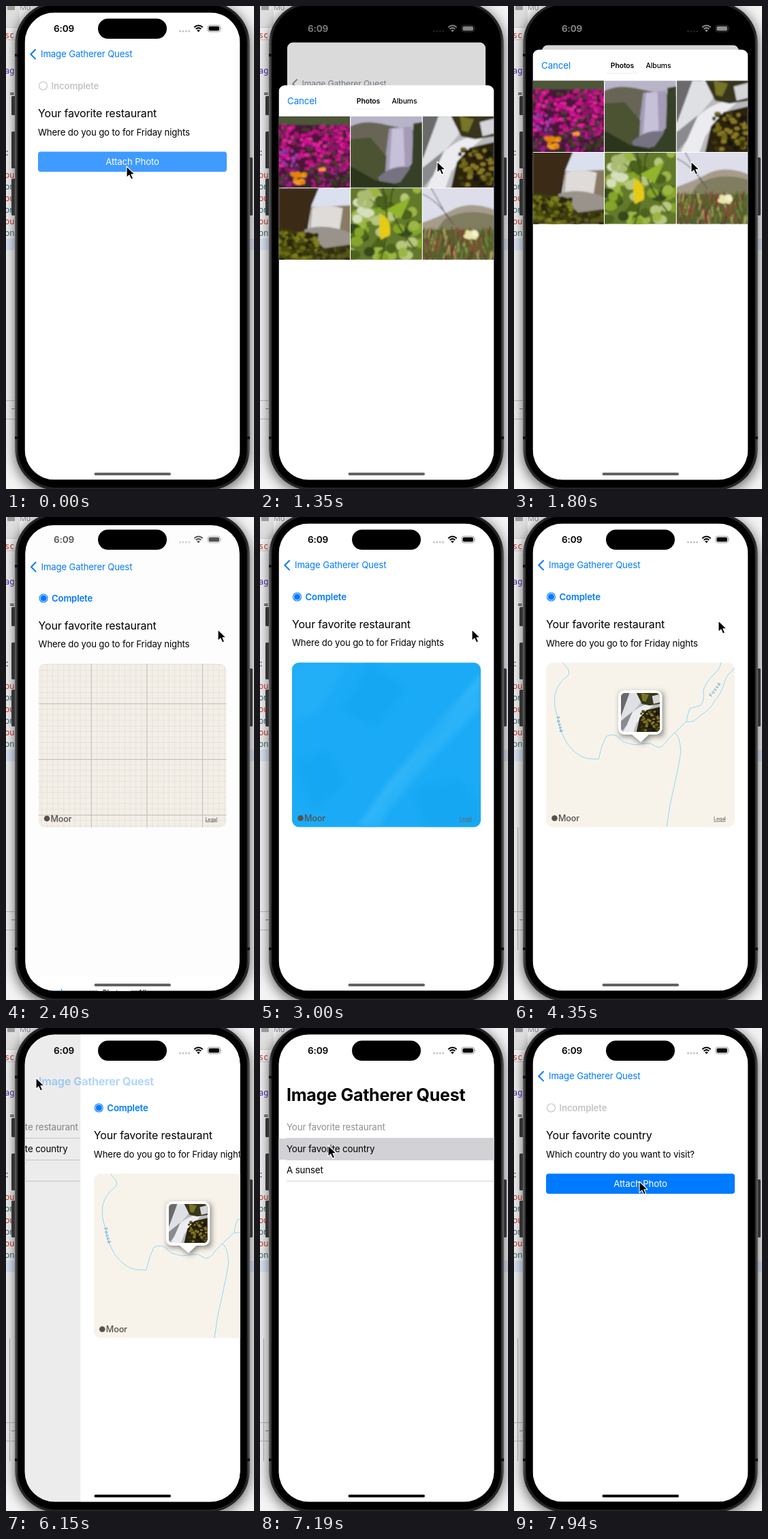
An HTML page that plays this animation: 364 by 708 pixels, repeating every 8000 ms.

```html
<!DOCTYPE html>
<html lang="en">
<head>
<meta charset="utf-8">
<title>Photo task</title>
<style>
html, body { margin: 0; width: 100%; height: 100%; overflow: hidden; background: #eee; }
svg { display: block; }
#stage { width: 100%; height: 100%; }
text { font-family: Inter, Roboto, sans-serif; letter-spacing: -.01em; white-space: pre; }
.mono { font-family: "Noto Sans Mono", "DejaVu Sans Mono", monospace; letter-spacing: 0; }
</style>
</head>
<body>
<svg id="stage" viewBox="0 0 364 708" xmlns="http://www.w3.org/2000/svg"></svg>
<script>
const LOOP = 8000, W = 316, BLUE = '#007aff';
const APP = 'Image Gatherer Quest';

const text = (x, y, size, str, attrs = '') =>
  `<text x="${x}" y="${y}" font-size="${size}" ${attrs}>${str}</text>`;
const rect = (x, y, w, h, fill, attrs = '') =>
  `<rect x="${x}" y="${y}" width="${w}" height="${h}" fill="${fill}" ${attrs}/>`;
const path = (d, fill, attrs = '') => `<path d="${d}" fill="${fill}" ${attrs}/>`;
const many = (n, fn) => Array.from({ length: n }, (_, i) => fn(i)).join('');

let seed = 7;
const rnd = (a = 0, b = 1) => {
  seed = (seed * 16807) % 2147483647;
  return a + (b - a) * seed / 2147483647;
};
const pick = list => list[Math.floor(rnd() * list.length)];
const dots = (n, x0, x1, y0, y1, r, colors) => many(n, () =>
  `<ellipse cx="${rnd(x0, x1).toFixed(1)}" cy="${rnd(y0, y1).toFixed(1)}" rx="${rnd(r * .6, r * 1.2).toFixed(1)}" ry="${(r * .7).toFixed(1)}" fill="${pick(colors)}"/>`);
const blades = (n, x0, x1, y0, y1, len, colors) => many(n, () =>
  path(`M${rnd(x0, x1).toFixed(1)} ${rnd(y0, y1).toFixed(1)}l${rnd(-5, 5).toFixed(1)} ${-len}`, 'none', `stroke="${pick(colors)}" stroke-width="1.6"`));

// Each photo is a 100 x 100 sketch.
const photos = [
  rect(0, 0, 100, 100, '#4a1737') + rect(0, 0, 100, 12, '#4d5639')
    + dots(260, 0, 100, 13, 80, 3.6, ['#d3108f', '#b40c7c', '#e0269f', '#c8128a', '#8c1268', '#493a32'])
    + dots(110, 0, 100, 72, 100, 3.4, ['#38421f', '#542254', '#28301a', '#9c1a78'])
    + dots(22, 0, 26, 45, 72, 2.5, ['#a343bd', '#8a38a6'])
    + dots(16, 18, 40, 77, 94, 4.2, ['#f5a51d', '#e4820b']) + dots(3, 58, 64, 71, 75, 3.5, ['#f5a51d']),
  rect(0, 0, 100, 100, '#b7b4c8') + path('M0 14Q20 4 50 12L100 22V100H0z', '#686556')
    + path('M54 17L86 14 92 76 46 78z', '#a49cb6') + path('M58 17L74 16 76 74 54 76z', '#c6c0d8')
    + path('M0 32L28 30 50 56 48 88 30 100H0z', '#4c5230') + path('M88 10L100 8V100H58L86 66z', '#364025')
    + path('M38 86Q60 66 84 72L70 92 44 98z', '#777282') + path('M0 70L35 90 60 94 70 100H0z', '#2a341c'),
  rect(0, 0, 100, 100, '#b9babd') + path('M0 0H36L25 42 0 62z', '#6a6a6b')
    + path('M22 0H56L50 26 30 50 0 92V60z', '#dfe0e4') + path('M28 52Q50 28 92 24L62 50 40 78 32 100H6z', '#ececf0')
    + path('M40 0H100V28L74 32 54 28z', '#38361b') + path('M52 0L72 4 64 22 55 20z', '#777428')
    + path('M100 36L66 44 48 64 40 100H100z', '#29230f')
    + dots(60, 52, 100, 44, 98, 4, ['#6f6719', '#3d390e', '#171509', '#8a7925'])
    + path('M0 72L30 48 14 84 0 100z', '#898b8e') + path('M80 8L100 3V24L84 28z', '#d4d4d9'),
  rect(0, 0, 100, 100, '#dbe0ee') + path('M0 0H56L46 24 40 62H0z', '#3b2b18')
    + path('M46 26L100 24V66H42z', '#8a7a64') + path('M47 27Q70 22 90 28L85 62H44z', '#dedbd8')
    + path('M36 58Q64 48 100 62V100H36z', '#99938c') + path('M0 56L38 62 64 84 100 79V100H0z', '#3a3b10')
    + dots(90, 0, 55, 62, 100, 4, ['#696d13', '#2a270f', '#50500f', '#82801f'])
    + dots(28, 55, 100, 84, 100, 4, ['#332c18', '#5a5a17']),
  rect(0, 0, 100, 100, '#62782a') + dots(54, 0, 100, 0, 100, 10, ['#84a42b', '#4c621f', '#9cb644', '#36491e', '#b8c77d'])
    + dots(10, 0, 28, 0, 45, 9, ['#d5dfba', '#a9bc72']) + path('M45 0Q58 50 42 100M60 0Q45 30 90 85', 'none', 'stroke="#414e1d" stroke-width="2"')
    + path('M50 30L84 12 70 43z', '#91b52b') + path('M42 36Q58 42 55 66L42 72Q38 55 42 36z', '#e5cb14'),
  rect(0, 0, 100, 100, '#dddeea') + path('M0 48Q28 38 46 28 70 18 100 30V70H0z', '#a69c8b')
    + path('M30 44Q60 26 100 38V64H15z', '#817d61') + rect(0, 58, 100, 42, '#59602f')
    + blades(160, 0, 100, 68, 106, 14, ['#78863a', '#934137', '#4e642c', '#a9a764', '#692d2d'])
    + path('M0 8Q25 20 43 51M12 0L36 43', 'none', 'stroke="#55515a"')
    + dots(9, 62, 74, 61, 69, 5, ['#f4f1ce', '#e8e5ad'])
];
const photo = (i, x, y, size, attrs = '') =>
  `<svg x="${x}" y="${y}" width="${size}" height="${size}" viewBox="0 0 100 100" ${attrs}><use href="#photo${i}"/></svg>`;

const defs = `<defs>
  ${photos.map((p, i) => `<g id="photo${i}">${p}<g filter="url(#haze)">${p}</g></g>`).join('')}
  <clipPath id="screen">${rect(27.5, 9.5, W, 685, '#000', 'rx="44"')}</clipPath>
  <clipPath id="map">${rect(47, 213.5, 277, 241, '#000', 'rx="10"')}</clipPath>
  <clipPath id="thumb">${rect(157, 258, 57, 57, '#000', 'rx="6"')}</clipPath>
  <filter id="blur" x="-20%" y="-20%" width="140%" height="140%"><feGaussianBlur stdDeviation="9"/></filter>
  <filter id="soft" x="-40%" y="-40%" width="180%" height="180%"><feGaussianBlur stdDeviation="4"/></filter>
  <filter id="haze"><feGaussianBlur stdDeviation=".8"/></filter>
  <linearGradient id="rim"><stop stop-color="#666"/><stop offset=".012" stop-color="#242426"/><stop offset=".988" stop-color="#242426"/><stop offset="1" stop-color="#666"/></linearGradient>
</defs>`;

const code = [[47, 'sc:', '#c8372d'], [99, 'agl', '#4b21a5'], [133, ' =', '#222'], [219, ':', '#222']]
  .concat([0, 1, 2, 3, 4, 5].map(i => [252 + i * 17, i % 2 ? 'on' : 'ou', i % 2 ? '#2f6b74' : '#c8372d']));

const backdrop = rect(0, 0, 364, 708, '#f3f3f3') + rect(0, 0, 20, 31, '#dedede') + rect(2, 0, 11, 6, '#999', 'rx="1"')
  + text(20, 6, 11, 'Mo', 'fill="#888"') + rect(0, 31, 16, 1, '#ccc') + rect(0, 49, 16, 1, '#ccc')
  + rect(0, 341, 364, 17, '#dce6f7')
  + code.map(([y, s, c]) => text(-2, y, 12, s, `class="mono" fill="${c}"`)).join('')
  + rect(0, 578, 14, 1, '#bbb') + rect(0, 605, 14, 1, '#bbb') + rect(8, 590, 5, 1, '#888')
  + rect(5, 455, 1, 180, '#b5b5b5', 'id="rule"')
  + rect(13, -2, 345, 716, '#000', 'rx="60" opacity=".6" filter="url(#blur)"')
  + [[132, 28], [184, 54], [253, 54]].map(([y, h]) => rect(8, y, 6, h, '#333', 'rx="1.5"')).join('')
  + rect(357, 222, 5, 85, '#333', 'rx="1.5"')
  + rect(13, -6, 345, 716, 'url(#rim)', 'rx="62"') + rect(17.5, -2, 336, 708, '#000', 'rx="56"')
  + rect(13, 70, 4, 4, '#111') + rect(13, 631, 4, 4, '#111') + rect(354, 631, 4, 4, '#111');

const row = (y, str, color) => text(39, y + 5, 13.3, str, `fill="${color}"`)
  + rect(39, y + 16, 305, 1, '#d4d4d6');
const list = `<g id="list">${rect(-80, 9, 540, 686, '#fff')}${rect(27, 162, 317, 31, '#d1d1d6', 'id="rowHit"')}
  ${row(145, 'Your favorite restaurant', '#8e8e93')}${row(177, 'Your favorite country', '#000')}${row(208, 'A sunset', '#000')}</g>
  ${rect(27, 9, 317, 686, '#000', 'id="listDim"')}`;

const lines = (step, color, w, x0, y0) => path(
  many(Math.ceil(290 / step), i => `M${(x0 + i * step).toFixed(1)} 213v242`) + many(Math.ceil(250 / step), i => `M47 ${(y0 + i * step).toFixed(1)}h278`),
  'none', `stroke="${color}" stroke-width="${w}"`);
const river = path('M71 213L80 224Q83 231 76 235 65 243 60 260 58 278 64 293 67 314 78 332 92 351 108 354L124 355 129 336 135 322Q142 317 151 321L161 330 177 334 191 332 200 332 212 338Q219 337 226 326L237 315 253 300Q255 288 258 281L274 276Q280 269 278 254 282 241 293 231 302 224 304 213M253 300Q264 302 272 292 290 281 294 270 304 260 310 239 313 230 325 221M235 316Q243 318 245 344 242 364 237 385L229 422 224 455',
  'none', 'stroke="#92d6f5"');
const label = (x, y, a) => text(x, y, 7, 'Fossá', `fill="#4a91c4" text-anchor="middle" style="letter-spacing:.14em" transform="rotate(${a} ${x} ${y})"`);
const map = `<g id="mapBox"><g clip-path="url(#map)">
  <g id="grid">${rect(47, 213, 278, 242, '#f5f1ea')}${lines(8.18, '#e8e2d8', .8, 51.5, 215)}${lines(82, '#c4c0b8', 1, 125, 272.5)}</g>
  <g id="sea">${rect(47, 213, 278, 242, '#1babf6')}
    <g filter="url(#soft)">${path('M47 213H128L86 284 47 300z', '#20aff7')}${path('M144 455L193 384 260 320 325 228V278L250 356 188 430 174 455z', '#2cb3f8')}
    ${path('M160 213L216 250 170 310 118 284zM226 400L290 380 325 420V455H240zM47 360L100 340 126 390 80 430z', '#17a7f3')}
    ${path('M150 450Q220 350 325 235', 'none', 'stroke="#50c0fa" stroke-width="5" opacity=".4"')}</g></g>
  <g id="land">${rect(47, 213, 278, 242, '#f7f3ea')}<g id="rivers">${river}${label(65, 305, 75)}${label(297, 254, -55)}</g></g></g>
  <circle cx="59.5" cy="441.5" r="4.3" fill="#55524e"/>
  ${text(65, 446, 12.6, 'Moor', 'fill="#55524e" font-weight="500"')}
  ${text(293, 445, 7, 'Legal', 'fill="#666" text-decoration="underline" font-weight="500"')}
  <g id="pin">${path('M154 256H217V319H199L186 331 172 319H154z', '#000', 'opacity=".5" filter="url(#soft)" transform="translate(2 2)"')}
    ${rect(153, 254, 64.5, 65, '#fff', 'rx="9"')}${path('M172 318H199L186 330z', '#fff')}
    <g clip-path="url(#thumb)">${photo(2, 157, 258, 57)}</g></g></g>`;

const page = `<g id="page">${rect(27.5, 9.5, W, 685, '#fff', 'id="card"')}
  <circle id="ring" cx="54.5" cy="117" r="6" fill="none"/><circle id="dot" cx="54.5" cy="117" r="4.6" fill="${BLUE}"/>
  ${text(66.5, 121.8, 13.2, '', 'id="state" font-weight="600"')}
  ${text(47, 163, 16, '', 'id="title"')}${text(47, 189.5, 13.2, '', 'id="sub"')}
  <g id="button">${rect(47, 213.5, 277, 29.5, BLUE, 'rx="4"')}${text(185.5, 233, 13.2, 'Attach Photo', 'fill="#fff" text-anchor="middle"')}</g>
  ${map}</g>`;

const nav = `<g id="nav">${path('M43 64L36.3 70.7 43 77.4', 'none', 'id="chevron" stroke-width="2" stroke-linecap="round" stroke-linejoin="round"')}
  ${text(0, 0, 13, APP, 'id="back"')}${text(0, 0, 13, APP, 'id="large" font-weight="700"')}</g>
  ${rect(27.5, 9.5, W, 685, '#000', 'id="dim"')}`;

const sheet = `<g id="sheet">${rect(27.5, 0, W, 720, '#fff', 'rx="9"')}
  ${text(40, 27.5, 13.4, 'Cancel', `fill="${BLUE}"`)}
  ${rect(135, 12, 48, 23, '#dedee2', 'rx="5"')}${rect(135, 11.5, 48, 23, '#fff', 'rx="5"')}
  ${text(159, 26.5, 10.4, 'Photos', 'text-anchor="middle" font-weight="600"')}
  ${text(212, 26.5, 10.4, 'Albums', 'text-anchor="middle" font-weight="500"')}
  ${many(6, i => photo(i, 27.5 + i % 3 * 105.7, 45.5 + Math.floor(i / 3) * 105.5, 104.5))}</g>`;

const status = `<g id="status">${text(85, 38, 13.6, '6:09', 'fill="currentColor" font-weight="600" text-anchor="middle"')}
  ${many(4, i => `<circle cx="${255.5 + i * 4.4}" cy="37" r="1.4" fill="currentColor" opacity=".25"/>`)}
  ${path('M276.3 31.3Q282.5 25.8 288.7 31.3M278.6 33.8Q282.5 30.5 286.4 33.8', 'none', 'stroke="currentColor" stroke-width="2"')}
  ${path('M280.2 35.8Q282.5 33.8 284.8 35.8L282.5 38.2z', 'currentColor')}
  ${rect(296, 28.2, 18.5, 9.6, 'none', 'rx="3" stroke="currentColor" stroke-opacity=".4"')}
  ${rect(297.5, 29.7, 15.5, 6.6, 'currentColor', 'rx="1.7"')}${path('M315.7 31.3q1.6 1.7 0 3.4z', 'currentColor', 'opacity=".5"')}</g>
  ${rect(135, 18.5, 101, 29.5, '#000', 'rx="14.7"')}${rect(129.5, 684, 112.5, 4, '#000', 'id="home" rx="2"')}`;

const cursor = `<g id="cursor">${path('M0 0V16.5L3.9 12.9 6.6 19 9.6 17.7 6.9 11.8H12.2z', '#000', 'stroke="#fff" stroke-width="1.1" stroke-linejoin="round"')}</g>`;

document.getElementById('stage').innerHTML = defs + backdrop
  + `<g clip-path="url(#screen)">${rect(27, 9, 317, 686, '#000')}${list}${page}${nav}${sheet}${status}</g>` + cursor;

const el = {};
document.querySelectorAll('[id]').forEach(n => el[n.id] = n);
const set = (id, attrs) => { for (const k in attrs) el[id].setAttribute(k, attrs[k]); };
const show = (id, on) => set(id, { display: on ? 'inline' : 'none' });
const clamp = v => Math.max(0, Math.min(1, v));
const mix = (a, b, k) => a + (b - a) * k;
const ramp = (t, a, b) => clamp((t - a) / (b - a));

// Critically damped spring, 0 to 1.
const spring = ms => {
  const x = Math.max(0, ms) * .0167;
  return 1 - (1 + x) * Math.exp(-x);
};

// time, x, y of the pointer tip
const moves = [
  [0, 177, 235], [550, 177, 235], [1050, 260, 228], [2085, 260, 228], [2390, 311, 165],
  [4150, 311, 165], [4350, 300, 152], [4650, 160, 112], [5050, 160, 112], [5600, 44, 73],
  [6250, 44, 73], [6800, 100, 172], [7400, 100, 172], [7880, 184, 225], [LOOP, 184, 225]
];
function pointer(t) {
  const i = moves.findIndex(m => m[0] > t);
  const [a, b] = [moves[i - 1], moves[i]];
  let k = ramp(t, a[0], b[0]);
  k = k * k * (3 - 2 * k);
  return [mix(a[1], b[1], k), mix(a[2], b[2], k)];
}

function draw(t) {
  const leaving = t >= 2085, second = t >= 7000, done = leaving && !second;
  const up = leaving ? 1 - spring(t - 2085) : spring(t - 1104);
  const behind = leaving ? 1 - spring(t - 2120) : up;
  const q = spring(t - 6092) - spring(t - 7260);

  show('list', q > .001);
  set('list', { transform: `translate(${-105 * (1 - q)} 0)` });
  set('listDim', { opacity: q > .001 ? .1 * (1 - q) : 0 });
  show('rowHit', t >= 7150 && t < 7800);

  const scale = 1 - .086 * behind, r = mix(44, 9, clamp(behind * 1.3));
  const shrink = `translate(185.5 ${9.5 + 48 * behind}) scale(${scale}) translate(-185.5 -9.5)`;
  set('page', { transform: `translate(${W * q} 0) ${shrink}` });
  set('card', { rx: behind > .001 ? r : 0 });
  set('dim', { rx: r, opacity: .16 * behind, transform: shrink });
  set('nav', { transform: `${shrink} translate(0 ${5 * behind})` });

  const tint = `rgb(${140 * behind},${mix(122, 140, behind)},${mix(255, 140, behind)})`;
  const pressed = t >= 5800 && t < 6900;
  const size = 13.2 + 11.8 * q;
  const place = { x: 51 - 12 * q, y: 70.5 + 28 * q + size * .36, 'font-size': size };
  set('back', { ...place, fill: tint, opacity: (pressed ? .45 : 1) * (1 - q), 'font-weight': 400 + 200 * clamp(q * 3) });
  set('large', { ...place, opacity: clamp((q - .35) / .65) });
  set('chevron', { stroke: tint, opacity: (pressed ? .45 : 1) * clamp(1 - q * 4) });

  set('ring', { stroke: done ? BLUE : '#c4c4c6', 'stroke-width': 1.1 });
  show('dot', done);
  set('state', { fill: done ? BLUE : '#c4c4c6' });
  el.state.textContent = done ? 'Complete' : 'Incomplete';
  el.title.textContent = 'Your favorite ' + (second ? 'country' : 'restaurant');
  el.sub.textContent = second ? 'Which country do you want to visit?' : 'Where do you go to for Friday nights';
  show('button', !done);
  set('button', { opacity: t < 150 ? .75 : 1 });

  show('mapBox', done);
  show('grid', t < 2700);
  show('sea', t >= 2700 && t < 3450);
  set('land', { opacity: ramp(t, 3150, 3450) });
  set('rivers', { opacity: ramp(t, 3450, 3750) });
  show('pin', t >= 3600);
  const pop = .5 + .5 * spring(t - 3600);
  set('pin', { transform: `translate(186 330) scale(${pop}) translate(-186 -330)` });

  show('sheet', up > .001);
  set('sheet', { transform: `translate(0 ${695 - 631 * up})` });
  const grey = 143 * (leaving ? 1 - ramp(t, 2100, 2800) : up);
  set('status', { color: `rgb(${grey},${grey},${grey})` });
  set('home', { fill: t < 6092 ? '#626264' : '#000' });
  show('rule', t >= 3150);
  set('cursor', { transform: `translate(${pointer(t)})` });
}

const start = performance.now();
function tick() {
  draw((performance.now() - start) % LOOP);
  requestAnimationFrame(tick);
}
draw(0);
requestAnimationFrame(tick);
</script>
</body>
</html>
```
